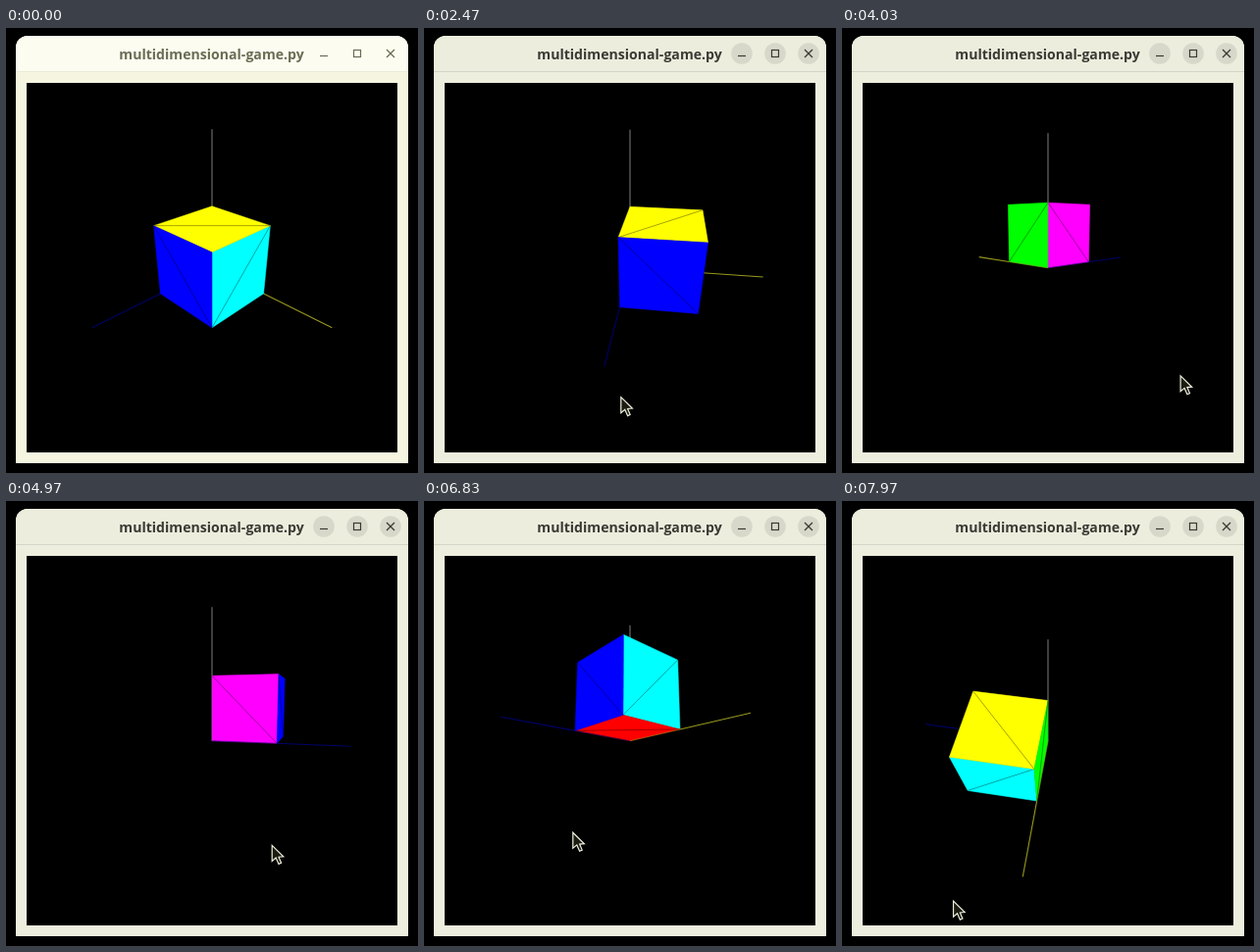
An HTML page with a canvas for the animation above (8000 ms loop, 420x454 px).

```html
<!DOCTYPE html>
<html lang="en">
<head>
<meta charset="utf-8">
<title>multidimensional-game.py</title>
<style>
  html, body { margin: 0; width: 100%; height: 100%; overflow: hidden; background: #000; }
  canvas { display: block; width: 420px; height: 454px; }
</style>
</head>
<body>
<canvas id="stage" width="420" height="454"></canvas>
<script>
const ctx = document.getElementById('stage').getContext('2d');
const LOOP = 8000;
const PRESS_AT = 1600, ENTER_TIME = 400, FADE_TIME = 200;
const DRAG_LAG = 70;
const VIEW = { x: 21, y: 56, w: 378, h: 377 };
const CENTER = { x: 210, y: 244.7 };
const DISTANCE = 5;
const FOCAL = VIEW.h / 2 / Math.tan(Math.PI / 6);

// Turning points of the drag; the view orbits one degree per dragged pixel.
const DRAG = [
  { t: 1650, yaw: 45, pitch: 30 },
  { t: 2470, yaw: 7.7, pitch: 31 },
  { t: 4030, yaw: -133.7, pitch: 8.7 },
  { t: 4300, yaw: -157, pitch: 10.5 },
  { t: 4970, yaw: -72.5, pitch: 7.1 },
  { t: 6030, yaw: -12.8, pitch: -63 },
  { t: 6830, yaw: 48.1, pitch: -12 },
  { t: 7970, yaw: 99, pitch: 58.5 },
  { t: 8100, yaw: 84, pitch: 64 }
];

const AXIS_COLORS = ['#98981c', '#6f786f', '#000068'];
const FACE_COLORS = [['#f0f', '#0ff'], ['#f00', '#ff0'], ['#0f0', '#00f']];

const clamp = v => Math.min(1, Math.max(0, v));

const slope = (i, key) =>
  (DRAG[i + 1][key] - DRAG[i][key]) / (DRAG[i + 1].t - DRAG[i].t);

// Monotone tangent: flat at turning points and ends, harmonic mean elsewhere.
function tangent(i, key) {
  if (i === 0 || i === DRAG.length - 1) return 0;
  const a = slope(i - 1, key), b = slope(i, key);
  return a * b > 0 ? 2 * a * b / (a + b) : 0;
}

function sample(t, key) {
  let i = 0;
  while (i < DRAG.length - 2 && t >= DRAG[i + 1].t) i++;
  const from = DRAG[i], to = DRAG[i + 1], span = to.t - from.t;
  const u = clamp((t - from.t) / span), v = 1 - u;
  return v * v * (1 + 2 * u) * from[key] + u * v * v * span * tangent(i, key)
    + u * u * (3 - 2 * u) * to[key] - u * u * v * span * tangent(i + 1, key);
}

// The pointer runs slightly ahead of the view it drags.
function pointerAt(t) {
  const away = clamp((PRESS_AT - t) / ENTER_TIME);
  return {
    x: 203.5 - sample(t + DRAG_LAG, 'yaw') - 12 * away,
    y: 345.3 + sample(t + DRAG_LAG, 'pitch') + 95 * away * away
  };
}

function makeCamera(yaw, pitch) {
  const a = yaw * Math.PI / 180, p = pitch * Math.PI / 180;
  const sa = Math.sin(a), ca = Math.cos(a), sp = Math.sin(p), cp = Math.cos(p);
  const eye = [sa * cp, sp, ca * cp].map(v => v * DISTANCE);
  const project = ([x, y, z]) => {
    const toward = x * sa + z * ca;
    const scale = FOCAL / (DISTANCE - toward * cp - y * sp);
    return [
      CENTER.x + scale * (x * ca - z * sa),
      CENTER.y - scale * (y * cp - toward * sp)
    ];
  };
  return { eye, project };
}

function trace(points, closed) {
  ctx.beginPath();
  points.forEach(([x, y]) => ctx.lineTo(x, y));
  if (closed) ctx.closePath();
}

function line(...points) {
  trace(points);
  ctx.stroke();
}

function point(axis, value, i = 0, j = 0) {
  const p = [0, 0, 0];
  p[axis] = value;
  p[(axis + 1) % 3] = i;
  p[(axis + 2) % 3] = j;
  return p;
}

function drawAxis(camera, axis, inFront) {
  const at = v => camera.project(point(axis, v));
  ctx.strokeStyle = AXIS_COLORS[axis];
  ctx.lineWidth = 1.1;
  ctx.globalAlpha = inFront ? 0.5 : 1;
  line(at(0), at(1));
  ctx.globalAlpha = 1;
  line(at(1), at(2));
}

function drawFace(camera, axis, side) {
  const corner = (i, j) => camera.project(point(axis, side, i, j));
  trace([corner(0, 0), corner(1, 0), corner(1, 1), corner(0, 1)], true);
  ctx.fillStyle = ctx.strokeStyle = FACE_COLORS[axis][side];
  ctx.lineWidth = 0.5;
  ctx.fill();
  ctx.stroke();
  ctx.strokeStyle = 'rgba(0,0,0,.45)';
  ctx.lineWidth = 0.8;
  line(corner(1, 0), corner(0, 1));
}

function drawScene(t) {
  const camera = makeCamera(sample(t, 'yaw'), sample(t, 'pitch'));
  const { eye } = camera;
  const inFront = k => eye[(k + 1) % 3] < 0 || eye[(k + 2) % 3] < 0;
  const axes = [0, 1, 2];

  axes.filter(k => !inFront(k)).forEach(k => drawAxis(camera, k, false));
  axes.forEach(k => {
    if (eye[k] < 0) drawFace(camera, k, 0);
    if (eye[k] > 1) drawFace(camera, k, 1);
  });
  axes.filter(inFront).forEach(k => drawAxis(camera, k, true));
}

function mix(from, to, f) {
  return `rgb(${from.map((v, i) => Math.round(v + (to[i] - v) * f))})`;
}

function panel(height, color) {
  ctx.fillStyle = color;
  ctx.beginPath();
  ctx.roundRect(10, 8, 400, height, [12, 12, 0, 0]);
  ctx.fill();
}

function drawWindow(focus) {
  panel(436, mix([245, 245, 224], [238, 238, 222], focus));
  panel(36, mix([252, 252, 240], [237, 237, 222], focus));
  ctx.fillStyle = mix([234, 234, 216], [212, 212, 200], focus);
  ctx.fillRect(10, 44, 400, 1);
  ctx.fillStyle = '#000';
  ctx.fillRect(VIEW.x, VIEW.y, VIEW.w, VIEW.h);

  const ink = mix([108, 108, 84], [58, 58, 52], focus);
  ctx.fillStyle = ink;
  ctx.font = 'bold 14.1px "Open Sans", "Noto Sans", sans-serif';
  ctx.textAlign = 'center';
  ctx.fillText('multidimensional-game.py', 209.5, 32);

  ctx.globalAlpha = focus;
  ctx.fillStyle = '#d8d8ca';
  for (const x of [324, 358, 392]) {
    ctx.beginPath();
    ctx.arc(x, 26, 10.8, 0, 2 * Math.PI);
    ctx.fill();
  }
  ctx.globalAlpha = 1;

  ctx.strokeStyle = ink;
  ctx.lineWidth = 1.2;
  line([320, 28.5], [328, 28.5]);
  ctx.strokeRect(354.5, 22.5, 7, 7);
  line([388, 22], [396, 30]);
  line([396, 22], [388, 30]);
}

function drawPointer({ x, y }) {
  const shape = [[0, 0], [0, 16], [4, 12.6], [6.8, 19], [9.4, 17.8], [6.8, 11.8], [11.6, 11.4]];
  trace(shape.map(([dx, dy]) => [x + 0.5 + dx, y + 0.5 + dy]), true);
  ctx.fillStyle = '#1c1c12';
  ctx.fill();
  ctx.strokeStyle = '#eeeedc';
  ctx.lineWidth = 1.2;
  ctx.stroke();
}

function draw(t) {
  ctx.fillStyle = '#000';
  ctx.fillRect(0, 0, 420, 454);
  drawWindow(clamp((t - PRESS_AT) / FADE_TIME));
  drawScene(t);
  if (t > PRESS_AT - ENTER_TIME) drawPointer(pointerAt(t));
}

const start = performance.now();
function tick() {
  draw((performance.now() - start) % LOOP);
  requestAnimationFrame(tick);
}
tick();
</script>
</body>
</html>
```
